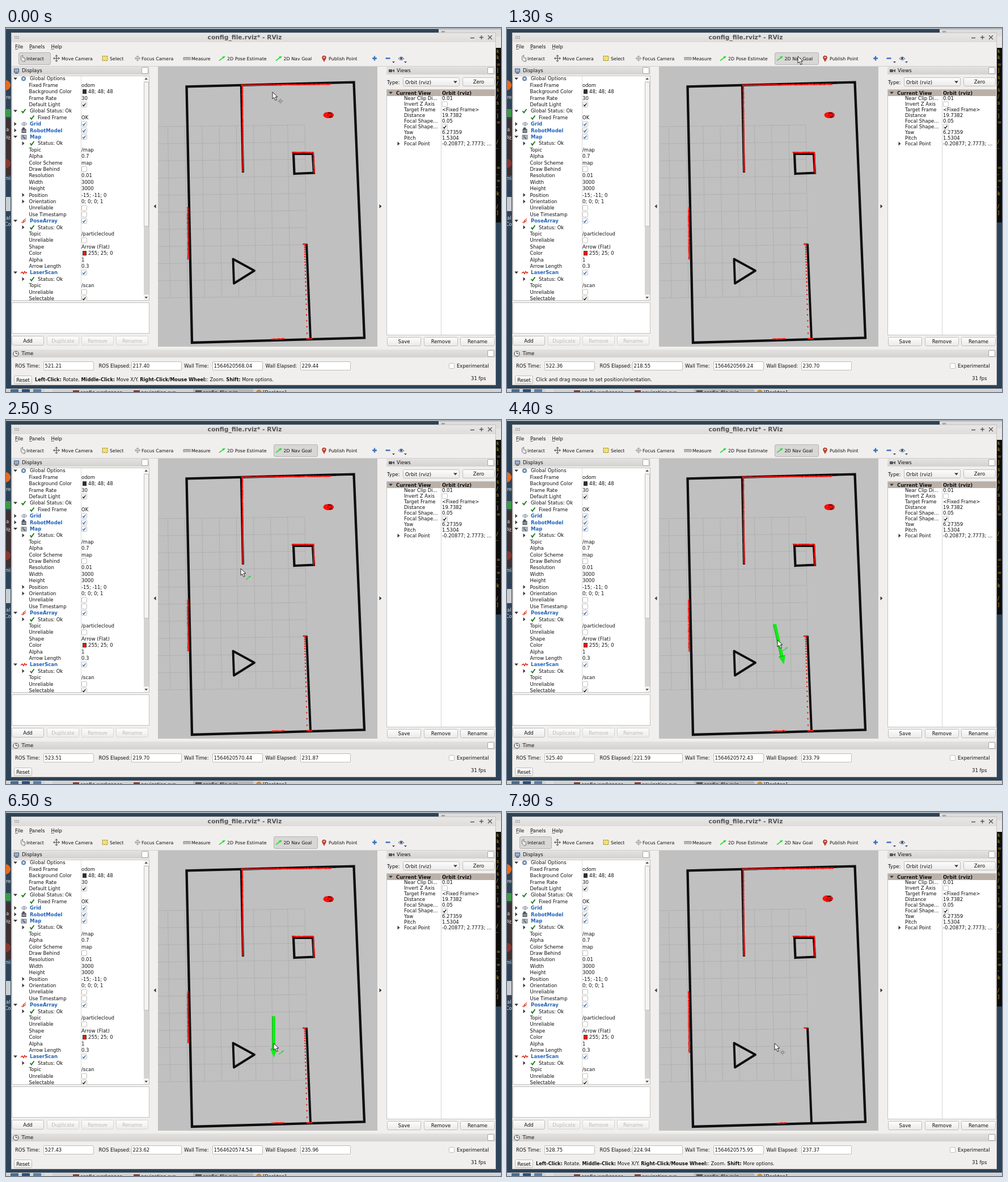
These frames come from a looping animation (873x642 px, 8 s). An HTML page:

```html
<!DOCTYPE html>
<html lang="en">
<head>
<meta charset="utf-8">
<title>RViz</title>
<style>
html, body { margin: 0; width: 100%; height: 100%; overflow: hidden; background: #2d4357; }
svg { display: block; width: 873px; height: 642px; }
text { font-family: "DejaVu Sans", sans-serif; font-size: 8.5px; fill: #111; white-space: pre; }
.b { font-weight: bold; }
</style>
</head>
<body>
<svg id="stage" viewBox="0 0 873 642" xmlns="http://www.w3.org/2000/svg">
  <defs>
    <linearGradient id="btn" x2="0" y2="1"><stop stop-color="#fdfdfd"/><stop offset="1" stop-color="#ebeae9"/></linearGradient>
    <linearGradient id="head" x2="0" y2="1"><stop stop-color="#e3e2e1"/><stop offset="1" stop-color="#d3d2d1"/></linearGradient>
    <linearGradient id="title" x2="0" y2="1"><stop stop-color="#e9e8e7"/><stop offset="1" stop-color="#dddcdb"/></linearGradient>
    <clipPath id="viewClip"><rect x="268" y="68" width="387" height="494"/></clipPath>
    <clipPath id="treeClip"><rect x="10" y="84" width="233" height="396.5"/></clipPath>
  </defs>
</svg>
<script>
const stage = document.getElementById('stage');
let layer = stage;

function el(tag, attrs, parent = layer) {
  const e = document.createElementNS('http://www.w3.org/2000/svg', tag);
  for (const k in attrs) e.setAttribute(k, attrs[k]);
  return parent.appendChild(e);
}
const rect = (x, y, width, height, fill, stroke = 'none', rx = 0) =>
  el('rect', { x, y, width, height, fill, stroke, rx });
const line = (d, stroke, width = 1, fill = 'none', more = {}) =>
  el('path', { d, stroke, fill, 'stroke-width': width, ...more });
const shape = (d, fill) => el('path', { d, fill });
const dot = (cx, cy, r, fill, stroke = 'none') => el('circle', { cx, cy, r, fill, stroke });
function text(x, y, str, o = {}) {
  const e = el('text', { x, y, class: o.bold ? 'b' : '', 'text-anchor': o.mid ? 'middle' : 'start' });
  e.style.cssText = `font-size:${o.size || 8.5}px;` + (o.fill ? `fill:${o.fill}` : '');
  e.textContent = str;
  return e;
}
function group(parent = stage, attrs = {}) {
  return layer = el('g', attrs, parent);
}
const downArrow = (x, y) => shape(`M${x - 3.5} ${y - 2}h7l-3.5 4z`, '#3a3a3a');
const rightArrow = (x, y) => shape(`M${x - 2} ${y - 3.5}v7l4-3.5z`, '#3a3a3a');
const leftArrow = (x, y) => shape(`M${x + 2} ${y - 3.5}v7l-4-3.5z`, '#3a3a3a');
const tick = (x, y, c, s = 1) =>
  line(`M${x - 3 * s} ${y}l${2 * s} ${2.6 * s}l${4 * s} ${-5.6 * s}`, c, 1.6 * s);
function checkbox(x, y, mark) {
  rect(x + .5, y - 4.5, 9, 9, '#fff', '#c3c1bf', 1.5);
  if (mark) tick(x + 4.8, y + .5, mark, .85);
}
function button(x, y, w, h, label, off) {
  rect(x + .5, y + .5, w - 1, h - 1, 'url(#btn)', off ? '#d8d6d4' : '#bfbdbb', 2);
  text(x + w / 2, y + h / 2 + 3, label, { mid: 1, fill: off ? '#bdbbb9' : '' });
}
function dock(x, y, w, label, labelX) {
  rect(x, y, w, 14, 'url(#head)');
  text(labelX, y + 10, label);
  rect(x + w - 13.5, y + 1.5, 11, 11, '#fdfdfd', '#aaa8a6', 1.5);
}
const greenArrow = (x, y, s = 1) => {
  line(`M${x - 5 * s} ${y + 4 * s}L${x + 3 * s} ${y - 2 * s}`, '#2edb3a', 1.6 * s);
  shape(`M${x + 6 * s} ${y - 4 * s}l${-6 * s} ${s}l${3 * s} ${3.4 * s}z`, '#2edb3a');
};

function rng(seed) {
  return () => (seed = (seed * 16807 + 11) % 2147483647) / 2147483647;
}

// Desktop behind the window
function desktop() {
  rect(0, 0, 873, 642, '#2d4357');
  rect(0, 0, 873, 1.5, '#cfd3d6');
  rect(763, 2, 110, 13, '#dddcdb');
  line('M768 6h6l-3 3z', '#777');
  rect(864, 15, 9, 20, '#e6e5e4');
  rect(864, 35, 9, 308, '#0c0c0c');
  const r = rng(7);
  for (let y = 44; y < 340; y += 11.4)
    if (r() < .85) text(865, y, 's=]/-k'[Math.floor(r() * 6)], { fill: '#c4991c' });
  rect(0, 160, 9, 100, '#3c3032');
  dot(-1, 101, 9, '#e66a1f');
  rect(0, 143, 8, 14, '#3a9a45');
  dot(0, 239, 8, '#8a3630');
  rect(0, 298, 8, 25, '#c9ced1');
  [['ire', 125], ['ia', 182], ['Pit', 197], ['mi', 268], ['ial', 338], ['Co', 349]]
    .forEach(([s, y]) => text(-2, y, s, { fill: '#e5e9ec', size: 8 }));
  rect(0, 636, 873, 6, '#d2d1d0');
  [[8, '#4a6c8c'], [28, '#2d4f82'], [48, '#5a7fa0'], [68, '#dcdcdc']].forEach(([x, c]) => rect(x, 637, 14, 5, c));
  rect(330, 637, 106, 5, '#b9b7b5');
  [[118, '#8a3b2c'], [225, '#8a3b2c'], [334, '#555']].forEach(([x, c]) => rect(x, 639, 11, 3, c));
  dot(446, 643, 5, '#d48a28');
  text(131, 646, 'config workspace');
  text(238, 646, 'navigation run');
  text(347, 646, 'config_file.rviz');
  text(453, 646, '[Desktop]');
}

function frame() {
  rect(9, 8, 855, 622, '#f1efee');
  rect(9, 8, 855, 17, 'url(#title)');
  line('M9 8.5H864M9.5 8V630M863.5 8V630M9 629.5H864', '#c4c2c0');
  line('M15 15h8M15 18h8', '#888', 1.6, 'none', { 'stroke-dasharray': '1.6 1.4' });
  text(421, 20.1, 'config_file.rviz* - RViz', { mid: 1, bold: 1, size: 10.7, fill: '#555' });
  line('M819 17.5h7M835 16.5h7M838.5 13v7M850 13l7 7M857 13l-7 7', '#555', 1.4);
  [['File', 16], ['Panels', 41], ['Help', 79.5]].forEach(([s, x]) => {
    text(x, 35.5, s);
    line(`M${x} 37.5h5`, '#333', .7);
  });
  line('M10 67.5H863', '#d2d0ce');
}

function toolbar() {
  const size = 7.95;
  [['Interact', 36], ['Move Camera', 98], ['Select', 183], ['Focus Camera', 239], ['Measure', 327],
   ['2D Pose Estimate', 390], ['2D Nav Goal', 489.5], ['Publish Point', 569]]
    .forEach(([s, x]) => text(x, 56.5, s, { size }));
  line('M26.5 50v6l3 3h4v-6l-4-1v-4z', '#777', 1, '#e6e6e6');
  line('M89 48v11M83.5 53.5h11', '#555', 1.2);
  line('M87 50l2-2.5 2 2.5M87 57l2 2.5 2-2.5M86 51.5l-2.5 2 2.5 2M92 51.5l2.5 2-2.5 2', '#555');
  line('M170 49.5h9v8h-9z', '#8a7a20', 1, '#f1e36a', { 'stroke-dasharray': '2 1' });
  dot(232, 53.5, 3.4, 'none', '#999');
  line('M232 48v11M226.5 53.5h11', '#999');
  rect(313, 52, 12, 4, '#c6c6c6', '#888');
  line('M316 52v2M319 52v2M322 52v2', '#666', .7);
  greenArrow(381, 53.5);
  greenArrow(481, 53.5);
  shape('M561 60l-3.4-6a3.8 3.8 0 1 1 6.8 0z', '#b8432f');
  dot(561, 52, 1.3, '#f2dcd6');
  line('M646 53.5h8M650 49.5v8M669.5 53.5h8', '#3b70bd', 2.4);
  line('M692 54q5-6 10 0q-5 5-10 0z', '#566a85', 1, '#dfe6ee');
  dot(697, 53.5, 2, '#34496b');
  shape('M681 59h5l-2.5 2.8zM702 59h5l-2.5 2.8z', '#444');
}

// arrow, icon, label, value; U, C, K stand for empty, blue and black check boxes
const tree = `v|gear|Global Options|
||Fixed Frame|odom
||Background Color|#303030 48; 48; 48
||Frame Rate|30
||Default Light|K
v|ok|Global Status: Ok|
|sub|Fixed Frame|OK
>|grid|Grid|C
>|robot|RobotModel|C
v|map|Map|C
r|sub|Status: Ok|
||Topic|/map
||Alpha|0.7
||Color Scheme|map
||Draw Behind|U
||Resolution|0.01
||Width|3000
||Height|3000
r||Position|-15; -11; 0
r||Orientation|0; 0; 0; 1
||Unreliable|U
||Use Timestamp|U
v|pose|PoseArray|C
r|sub|Status: Ok|
||Topic|/particlecloud
||Unreliable|U
||Shape|Arrow (Flat)
||Color|#ff1900 255; 25; 0
||Alpha|1
||Arrow Length|0.3
v|scan|LaserScan|C
r|sub|Status: Ok|
||Topic|/scan
||Unreliable|U
||Selectable|K`;

const icons = {
  gear: y => { dot(31, y, 3.6, '#7f9fc4', '#4a6d99'); dot(31, y, 1.3, '#fff'); },
  ok: y => tick(31, y, '#1e7a1e', 1.15),
  sub: y => tick(46, y, '#1e7a1e', 1.15),
  grid: y => line(`M27 ${y}q5-6 10 0q-5 6-10 0M32 ${y - 3}v6M29 ${y}h6`, '#7d8797', 1),
  robot: y => { rect(28, y - 2, 7, 6, '#8791a0', '#444'); dot(31, y - 3, 2.4, '#48515e'); },
  map: y => { rect(27, y - 3, 9, 7, '#b9c0c6', '#6f7d88'); line(`M30 ${y - 3}v4h3v3`, '#333'); },
  pose: y => line(`M27 ${y + 3}l5-3M29 ${y + 4}l6-5M30 ${y}l5-4`, '#e3452f', 1.2),
  scan: y => line(`M26 ${y + 1}l3-2 2 3 2-4 2 3 2-2`, '#e02a20', 1.5)
};

function displays() {
  dock(10, 68, 243, 'Displays', 28);
  rect(14.5, 72, 8, 6, '#8fb3de', '#4a5a70');
  rect(16, 79, 5, 1.5, '#555');
  rect(10.5, 84.5, 242, 396, '#fff', '#c4c2c0');
  line('M132.5 85V480', '#dedcda');
  const panel = layer;
  group(panel, { 'clip-path': 'url(#treeClip)' });
  tree.split('\n').forEach((row, i) => {
    const [arrow, icon, label, value] = row.split('|');
    const y = 89.4 + 11.4 * i, base = y + 3;
    if (arrow === 'v') downArrow(16.5, y);
    if (arrow === '>') rightArrow(16.5, y);
    if (arrow === 'r') rightArrow(30.5, y);
    if (icon) icons[icon](y);
    const blue = value === 'C';
    text(icon === 'sub' ? 56 : icon ? 42 : 40.5, base, label, { bold: blue, fill: blue ? '#2163b8' : '' });
    if (/^[UCK]$/.test(value)) checkbox(133, y, { C: '#2163b8', K: '#111' }[value]);
    else if (value[0] === '#') {
      rect(135.5, y - 3.5, 6, 7, value.slice(0, 7), '#333');
      text(145, base, value.slice(8));
    } else text(133, base, value);
  });
  layer = panel;
  rect(243, 85, 9, 395, '#d6d4d2');
  rect(243.5, 95.5, 8, 254, '#f4f3f2', '#bdbbb9');
  rect(243, 85, 9, 10, '#f4f3f2');
  rect(243, 470, 9, 10, '#f4f3f2');
  shape('M244.5 91l2.7-3.2 2.7 3.2zM244.5 474l2.7 3.2 2.7-3.2z', '#444');
  rect(10.5, 484.5, 242, 54, '#fff', '#c4c2c0');
  button(10, 543, 57, 17, 'Add');
  button(72, 543, 57, 17, 'Duplicate', 1);
  button(133, 543, 57, 17, 'Remove', 1);
  button(194, 543, 57, 17, 'Rename', 1);
  leftArrow(262.5, 314.5);
  rightArrow(660.5, 314.5);
}

function views() {
  dock(671, 68, 192, 'Views', 689);
  rect(675, 73, 6, 5, '#555');
  shape('M681 75l4-2.5v6z', '#555');
  text(672, 98.5, 'Type:');
  rect(700.5, 87.5, 99, 15, 'url(#btn)', '#bfbdbb', 2);
  text(704, 98.5, 'Orbit (rviz)');
  downArrow(792.5, 95.5);
  button(805, 87, 57, 16, 'Zero');
  rect(671.5, 108.5, 191, 433, '#fff', '#c4c2c0');
  rect(672, 109, 190, 11, '#bab0a8');
  downArrow(678.5, 114.5);
  text(688, 117.5, 'Current View', { bold: 1, size: 8.4 });
  text(769, 117.5, 'Orbit (rviz)', { bold: 1, size: 8.4 });
  line('M767.5 109V541', '#d6d4d2');
  [['Near Clip Di...', '0.01'], ['Invert Z Axis', 'U'], ['Target Frame', '<Fixed Frame>'], ['Distance', '19.7382'],
   ['Focal Shape...', '0.05'], ['Focal Shape...', 'K'], ['Yaw', '6.27359'], ['Pitch', '1.5304'],
   ['Focal Point', '-0.20877; 2.7773; ...']].forEach(([label, value], i) => {
    const y = 124.4 + 9.97 * i;
    text(702, y + 3, label);
    if (/^[UK]$/.test(value)) checkbox(769, y, value === 'K' && '#111');
    else text(769, y + 3, value);
  });
  rightArrow(692.5, 204);
  button(672, 545, 60, 16, 'Save');
  button(737, 545, 60, 16, 'Remove');
  button(801, 545, 61, 16, 'Rename');
}

function timePanel() {
  dock(10, 567, 853, 'Time', 27.5);
  dot(17.5, 574.5, 4.5, '#f4f4f4', '#333');
  line('M17.5 571.5v3h2.5', '#333');
  const fields = [['ROS Time:', 16, 66], ['ROS Elapsed:', 163.5, 221], ['Wall Time:', 314, 364], ['Wall Elapsed:', 457.5, 519]]
    .map(([label, x, fx]) => {
      text(x, 599, label, { size: 8.4 });
      rect(fx + .5, 588.5, 88, 15, '#fff', '#bfbdbb', 1.5);
      return text(fx + 2.5, 599.2, '');
    });
  checkbox(781, 596);
  text(795, 599, 'Experimental');
  button(14, 613, 32, 15, 'Reset');
  text(820, 621, '31 fps');
  return fields;
}

function scene() {
  rect(268, 68, 387, 494, '#c0c0c0');
  let d = '';
  for (let i = 0; i <= 10; i++) {
    d += `M${527 - 30.2 * i} ${171 + .35 * i}l4.5 302`;
    d += `M${527 + .45 * i} ${171 + 30.2 * i}l-302 3.5`;
  }
  line(d, '#a9a9a9', .7);
  const ink = '#0e0e0e';
  line('M318.5 103.3L613.5 95.7L632 546.5L328 555Z', ink, 4.3);
  line('M414.8 101L418 255M530 380.5L537 548', ink, 4);
  line('M507 222L541 222L543 255.5L508.5 257Z', ink, 4.2);
  line('M400.5 407.5L438 428L402 450.5Z', ink, 3.9, 'none', { 'stroke-linejoin': 'round' });
}

group(); desktop();
group(); frame();
group();
const interactBg = rect(22.5, 43.5, 56, 21, '#d8d7d6', '#b5b3b1', 2.5);
const navBg = rect(472.5, 43.5, 77, 21, '#d8d7d6', '#b5b3b1', 2.5);
toolbar();
group(); displays(); views();
const fields = timePanel();
const help = text(51, 623, '', { size: 8.2 });
[['Left-Click:', 1], [' Rotate. '], ['Middle-Click:', 1], [' Move X/Y. '], ['Right-Click/Mouse Wheel:', 1],
 [': Zoom. '], ['Shift:', 1], [' More options.']]
  .forEach(([s, bold]) => { el('tspan', bold ? { class: 'b' } : {}, help).textContent = s; });
const hint = text(51, 623, 'Click and drag mouse to set position/orientation.', { size: 8.4 });

const view = group(stage, { 'clip-path': 'url(#viewClip)' });
scene();
const scan = line('', '#fa0f0a', 2.3);
const robot = group(view);
layer = view;
const goal = group(view);
shape('M-2.7 0h5.4v58h3.3l-6 15l-6-15h3.3z', '#10ee14');
line('M-2.7 0v58M-6 58h12', '#0b9c10', .8);

const cursor = group();
const crossIcon = group(cursor);
line('M14 11v10M8.5 16h11M11 13.5l6 5M17 13.5l-6 5', '#858585', .8);
dot(14, 16, 1.8, '#d4d4d4', '#777');
const navIcon = group(cursor);
greenArrow(13.5, 16, .85);
layer = cursor;
line('M0 0v12l2.8-2.6l2.2 5.2l2.3-1l-2.2-5h3.9z', '#111', .9, '#fff');

// Laser returns: small red specks along a wall, with slight noise
function specks(r, x1, y1, x2, y2, noise = .4) {
  const n = Math.max(2, Math.round(Math.hypot(x2 - x1, y2 - y1) / 1.7));
  let d = '';
  for (let i = 0; i <= n; i++) {
    const x = x1 + (x2 - x1) * i / n + (r() - .5) * 2 * noise;
    const y = y1 + (y2 - y1) * i / n + (r() - .5) * 2 * noise;
    d += `M${(x - 1.1).toFixed(1)} ${y.toFixed(1)}h2.2`;
  }
  return d;
}

function drawScan(t, k) {
  const r = rng(t + 101);
  let d = specks(r, 416, 101, 573 + 2 * k, 99) + specks(r, 416.8, 101, 418, 253, .3)
    + specks(r, 505, 219.5, 542, 219.5) + specks(r, 542.3, 220, 543.2, 255)
    + specks(r, 320.5, 317, 321.3, 407 + 17 * k, .5)
    + specks(r, 469 + 8 * k, 549, 490 + 2 * k, 548.3) + specks(r, 524.5, 381, 529, 381, .3);
  if (k < 1) {
    d += specks(r, 531, 548.3, 539, 548);
    for (let y = 384, gap = 3.5; y < 542; y += gap, gap *= 1.055)
      d += `M${(525.7 + (y - 384) * .028).toFixed(1)} ${y.toFixed(1)}h2`;
  }
  scan.setAttribute('d', d);
}

function drawRobot(k) {
  robot.replaceChildren();
  layer = robot;
  const r = rng(42);
  const cx = 568.8 - 3 * k, cy = 153.5 - .8 * k;
  el('ellipse', { cx, cy, rx: 9.3, ry: 5.6, fill: '#fa0f0a' });
  let d = '';
  for (let i = 0; i < 36; i++) {
    const a = r() * 6.283, s = Math.sqrt(r());
    d += `M${cx + Math.cos(a) * 8 * s} ${cy + Math.sin(a) * (5.6 + k) * s}l${(r() - .5) * 8} ${(r() - .5) * (2 + 2 * k)}`;
  }
  line(d, '#fa0f0a', 1.4);
  line(`M${cx - 1} ${cy - 3.5}h6M${cx + 1} ${cy + 3.2}h6M${cx + 5} ${cy - 1}v2M${cx - 2} ${cy + .5}h2`, '#2a0505', 1.4);
}

function track(keys, t) {
  let i = 1;
  while (i < keys.length - 1 && keys[i][0] < t) i++;
  const a = keys[i - 1], b = keys[i];
  const f = Math.min(1, Math.max(0, (t - a[0]) / (b[0] - a[0])));
  return a.slice(1).map((v, j) => v + (b[j + 1] - v) * f);
}

const pointerKeys = [[0, 470, 113], [100, 470, 113], [800, 513, 49], [1300, 513, 50], [1600, 510, 54], [1700, 503, 67],
  [1900, 480, 119], [2500, 414, 262], [4400, 477, 388], [6500, 472, 408]];
// ROS time, wall time, wall elapsed
const clockKeys = [[0, 521.21, 568.04, 229.44], [800, 521.89, 568.75, 230.21], [1700, 522.74, 569.64, 231.10],
  [2500, 523.51, 570.44, 231.87], [4400, 525.40, 572.43, 233.79], [6500, 527.43, 574.54, 235.96], [7900, 528.75, 575.95, 237.37]];
const steps = [0];
for (let t = 200; t <= 2500; t += 100) steps.push(t);
steps.push(4400, 4600, 4800, 5100, 5300, 5700, 6000, 6200, 6500, 6700, 7000, 7400, 7600, 7900);

const PICK = 1300, ENTER = 1800, DRAG = 4400, DROP = 6700, READY = 7000;
const show = (e, on) => e.setAttribute('visibility', on ? 'visible' : 'hidden');

function pose(t) {
  const [x, y] = track(pointerKeys, t);
  const nav = t >= PICK && t < DROP;
  const inView = y > 68;
  const hover = !nav && x > 472 && x < 550 && y > 43 && y < 65;
  cursor.setAttribute('transform', `translate(${x.toFixed(1)} ${y.toFixed(1)})`);
  show(crossIcon, inView && (t < PICK || t >= READY));
  show(navIcon, inView && t >= PICK && t < READY);
  show(interactBg, !nav);
  show(navBg, nav || hover);
  navBg.setAttribute('fill', nav ? '#d8d7d6' : '#fbfbfb');
  show(help, t < PICK || t >= READY);
  show(hint, t >= PICK && t < ENTER);

  show(goal, t >= DRAG && t < DROP);
  const [turn] = track([[DRAG, -12.7], [6500, 0]], t);
  goal.setAttribute('transform', `translate(472.3 360) rotate(${turn})`);

  const [ros, wall, elapsed] = track(clockKeys, t);
  [ros, ros - 303.81, wall, elapsed].forEach((v, i) => {
    fields[i].textContent = (i === 2 ? '1564620' : '') + v.toFixed(2);
  });

  const k = Math.min(1, Math.max(0, (t - 7300) / 600));
  drawScan(t, k);
  drawRobot(k);
}

const start = performance.now();
let last = -1;
function tickFrame() {
  const t = (performance.now() - start) % 8000;
  const step = steps.filter(s => s <= t).pop();
  if (step !== last) pose(last = step);
  requestAnimationFrame(tickFrame);
}
tickFrame();
</script>
</body>
</html>
```
